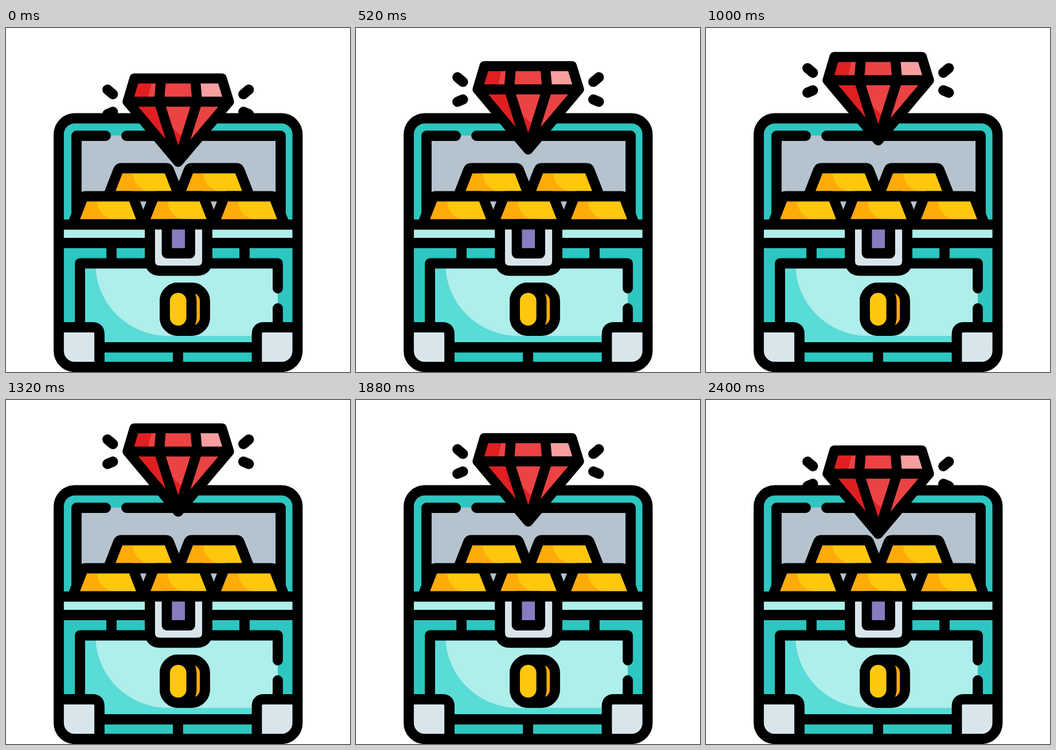
Animation, 600 px wide and 600 px high, one loop 2.44 s. Source, as an HTML page:

```html
<!DOCTYPE html>
<html lang="en">
<head>
<meta charset="utf-8">
<title>Treasure chest</title>
<style>
  html, body { margin: 0; width: 100%; height: 100%; overflow: hidden; background: #fff; }
  svg { display: block; width: 100vw; height: 100vh; }
  .line { fill: none; stroke: #000; stroke-width: 17.8; stroke-linecap: round; stroke-linejoin: round; }
  .teal { fill: #2dc6c0; }
  .pale { fill: #aeeeeb; }
  .mid { fill: #59dbd7; }
  .steel { fill: #d8e6ec; }
  .gold { fill: #ffc70e; }
  .amber { fill: #ffab0a; }
</style>
</head>
<body>
<svg viewBox="0 0 600 600" xmlns="http://www.w3.org/2000/svg">
  <defs>
    <g id="bar">
      <path class="gold" d="M-43 0H43L62 49H-62Z"/>
      <path class="amber" d="M-43 0H-19C-22 24 -6 42 20 42V49H-62Z"/>
      <path class="line" d="M-62 49L-44.5 4Q-43 0 -39 0H39Q43 0 44.5 4L62 49Z"/>
    </g>
    <g id="corner">
      <path class="steel" d="M92 522H151Q163 522 163 534V591H119Q92 591 92 564Z"/>
      <path class="line" d="M92 522H151Q163 522 163 534V591"/>
    </g>
    <path id="rays" class="line" d="M177 107.5L186.5 115.5M177 150.2L186.5 146.2"/>
  </defs>

  <!-- chest body and lid -->
  <rect class="teal" x="92" y="157.5" width="416.5" height="433.7" rx="28"/>
  <path fill="#b5c3cf" d="M123 187.4H479V342H123Z"/>
  <path class="line" d="M123 342V188H174M210 188H479V342"/>

  <!-- gold -->
  <use href="#bar" x="240" y="244.5"/>
  <use href="#bar" x="363" y="244.5"/>
  <use href="#bar" x="178" y="293.5"/>
  <use href="#bar" x="301" y="293.5"/>
  <use href="#bar" x="424" y="293.5"/>

  <!-- front -->
  <path class="pale" d="M92 342.5H508V375H92Z"/>
  <path class="pale" d="M129 410.5H474V557H129Z"/>
  <path class="mid" d="M129 410.5H156C156 480 212 537 283 537H451V557H129Z"/>
  <path class="line" d="M92 342.8H508M92 375H508M184 375V410M416 375V410"/>
  <path class="line" d="M129 522V410.5H474V454M474 489V522M163 557H437M300 557V591"/>
  <use href="#corner"/>
  <use href="#corner" transform="matrix(-1 0 0 1 600.5 0)"/>
  <rect class="line" x="92" y="157.5" width="416.5" height="433.7" rx="28"/>

  <!-- clasp -->
  <path class="steel" d="M251 342.5V405Q251 423 269 423H333Q351 423 351 405V342.5Z"/>
  <path class="line" d="M251 342.5V405Q251 423.3 269 423.3H333Q351 423.3 351 405V342.5Z"/>
  <path class="line" style="fill:#887bc0" d="M280.5 342.5V393H321V342.5Z"/>

  <!-- lock -->
  <rect class="line amber" style="fill:#ffab0a" x="277" y="453" width="70" height="75" rx="23"/>
  <rect class="line" style="fill:#ffc70e" x="277" y="453" width="46.5" height="75" rx="23"/>

  <!-- ruby -->
  <g id="ruby">
    <use href="#rays"/>
    <use href="#rays" transform="matrix(-1 0 0 1 600.5 0)"/>
    <path fill="#eb4344" d="M224 88H377L389 128.5L300 233.5L212 128.5Z"/>
    <path fill="#e01f22" d="M224 88H256L246 128L268 140Q282 170 312 193L300 233L212 128Z"/>
    <path fill="#f69ea0" d="M330 88H377L389 128H334Z"/>
    <path class="line" style="stroke-width:17.4" d="M224 88H376.5L389 128.5L300.3 233.5L212 128.5ZM212 128.5H389M270.5 88L267 128.5L300.3 233.5L333.5 128.5L330 88"/>
  </g>
</svg>
<script>
  const LOOP = 2440, STEP = 40, HALF = 1200, RISE = 39.4, START = 1.05;
  const ruby = document.getElementById('ruby');

  // Brisk start, soft stop at the top.
  const ease = x => START * x + (3 - 2 * START) * x * x + (START - 2) * x * x * x;

  function draw(ms) {
    const t = Math.floor((ms % LOOP) / STEP) * STEP;
    const x = 1 - Math.abs(t - HALF) / HALF;
    ruby.setAttribute('transform', `translate(0 ${(-RISE * ease(x)).toFixed(2)})`);
  }

  const begin = performance.now();
  function tick() {
    draw(performance.now() - begin);
    requestAnimationFrame(tick);
  }
  tick();
</script>
</body>
</html>
```
